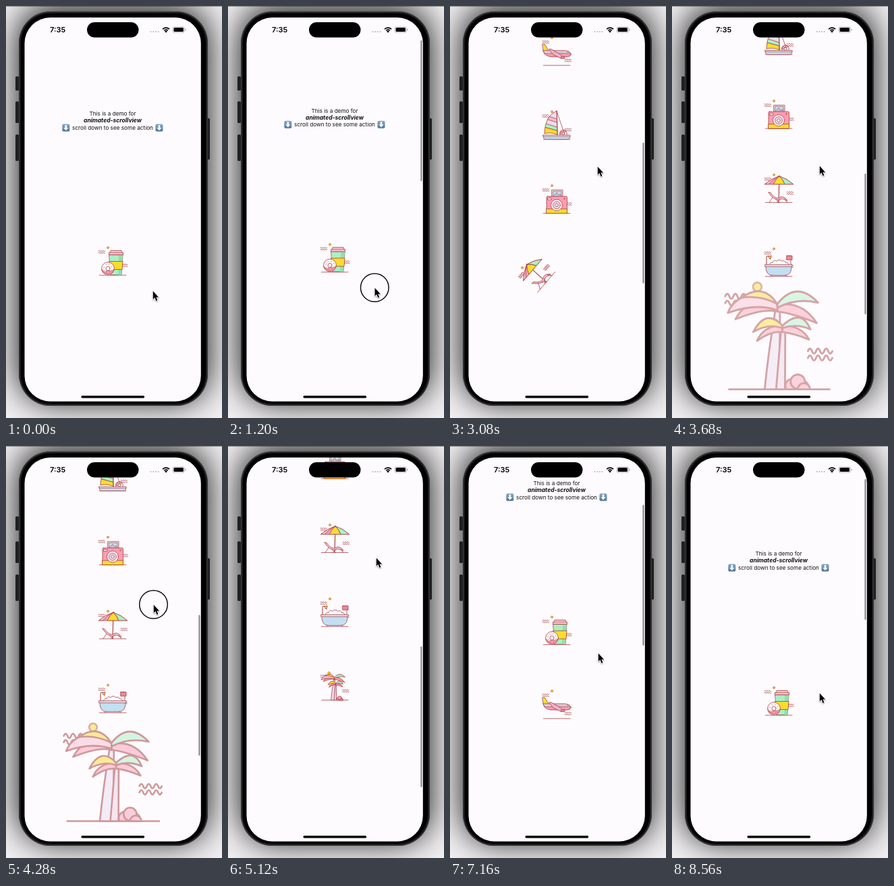
Write an HTML page with a canvas that moves like this. It is 320 px wide and 609 px high and loops after 8.6 s.

```html
<!DOCTYPE html>
<html lang="en">
<head>
<meta charset="utf-8">
<title>Scroll demo</title>
<style>
html, body { margin: 0; width: 100%; height: 100%; overflow: hidden; background: #ccc; }
canvas { display: block; width: 320px; height: 609px; }
</style>
</head>
<body>
<canvas id="stage"></canvas>
<script>
const W = 320, H = 609, LOOP = 8600, LAG = 48;
const INK = '#a3393c', PINK = '#fa9db4', YELLOW = '#fbdc2c', GREEN = '#aaf0c6',
  BLUE = '#c3dff2', LILAC = '#eadcee', WHITE = '#fff', PAPER = '#fdfbfe';
const dpr = window.devicePixelRatio || 1;

function makeLayer(canvas) {
  canvas.width = W * dpr;
  canvas.height = H * dpr;
  const c = canvas.getContext('2d');
  c.scale(dpr, dpr);
  return c;
}
const main = makeLayer(document.getElementById('stage'));
const layer = makeLayer(document.createElement('canvas'));
let g = main;

// ---- drawing helpers
function shape(d, fill, line = INK, width = 0.75) {
  const p = new Path2D(d);
  if (fill) { g.fillStyle = fill; g.fill(p); }
  if (line) { g.strokeStyle = line; g.lineWidth = width; g.stroke(p); }
}
function disc(x, y, r, fill, line = INK, width = 0.75) {
  g.beginPath();
  g.arc(x, y, r, 0, Math.PI * 2);
  if (fill) { g.fillStyle = fill; g.fill(); }
  if (line) { g.strokeStyle = line; g.lineWidth = width; g.stroke(); }
}
function box(x, y, w, h, r, fill) {
  g.beginPath();
  g.roundRect(x, y, w, h, r);
  g.fillStyle = fill;
  g.fill();
}
function waves(x, y, n = 3) {
  for (const dy of [0, 2.7]) {
    let d = `M${x} ${y + dy}`;
    for (let i = 0; i < n; i++) d += 'q.8 -1.9 1.6 0t1.6 0';
    shape(d, null);
  }
}
function scenery(rx, ry, n = 3) {
  disc(-7, -19.3, 1.5, YELLOW, '#b9653a');
  waves(-21, -14.3);
  waves(rx, ry, n);
  shape('M-19.7 21.5H20', null);
}

// ---- icons, centred on the origin
function coffee() {
  scenery(12.5, 5.5);
  shape('M-5 -9H15L13 21H-3Z', GREEN);
  shape('M9 -9H15L13 21H8Z', '#93dfb3', null);
  shape('M-5 1H15L14 13H-4Z', YELLOW);
  shape('M-5.5 -9V-12H-4L-3 -15H13L14 -12H15.5V-9Z', '#fbc3d0');
  shape('M-4 -12H14', null, INK, 0.6);
  disc(-7, 11.6, 9.4, '#fff4f6');
  shape('M-16 13A9.4 9.4 0 0 0 2 13Q-1 16 -4 15T-10 16T-16 13Z', PINK, INK, 0.6);
  disc(-7, 11.6, 3, WHITE);
  for (let i = 0; i < 8; i++) {
    const a = i * 0.785 + 0.3;
    disc(-7 + 6.2 * Math.cos(a), 11.6 + 6.2 * Math.sin(a), 0.5, INK, null);
  }
}
function plane() {
  scenery(12, 12.8);
  shape('M-21 -9.5H-17.5L-12 -0.5 -19 2Z', YELLOW);
  shape('M-20 -0.5H12Q19 0 21.5 5Q20.5 8.5 15 8.5H-9Q-18 7 -20 -0.5Z', '#dccddd');
  shape('M-18.5 4H21Q20 8.5 15 8.5H-9Q-16 7.5 -18.5 4Z', PINK, INK, 0.6);
  shape('M-11 -2.5H-8L5 5 11 11H6L-5 5.5Z', '#f1b3c3');
  shape('M7 8.5H12V11H7Z', PINK);
  shape('M15 1.8H18.5', null);
  for (let x = -2; x < 13; x += 3) disc(x, 2, 0.45, INK, null);
}
function sail() {
  scenery(12, 6);
  const canvas = 'M0 -20.5Q-17 -14 -18.2 13Q-8 10.5 1 14.5Z';
  g.save();
  g.clip(new Path2D(canvas));
  shape('M-20 -22H2V16H-20Z', LILAC, null);
  shape('M-20 -15L2 -8V-3L-20 -10Z', '#f7bccd');
  shape('M-20 -3L2 4V9L-20 3Z', GREEN);
  shape('M-20 3L2 9V16H-20Z', YELLOW);
  g.restore();
  shape(canvas, null);
  shape('M0 -20.5L1 15M0 -20.5L10 9', null);
  disc(10, 13, 5.3, WHITE);
  shape('M4.7 13A5.3 5.3 0 0 1 7 8.6L8.5 11V13ZM10 7.7A5.3 5.3 0 0 1 14 9.5L12 11.5 10 11Z', PINK);
  disc(10, 13, 2, WHITE);
  shape('M-20 15.5H20Q20 21.5 16 21.5H-16Q-20 21.5 -20 15.5Z', BLUE);
  shape('M-20 15.5H20V17.5H-19.5Z', '#e4eaf5', INK, 0.6);
}
function camera() {
  scenery(16, 6.4, 2);
  shape('M-7 -13H9V0H-7Z', '#dfe9f2');
  shape('M-5 -11H7V-4H-5Z', BLUE, INK, 0.6);
  shape('M-5 -4L0 -9 3 -5 5 -7 7 -4', '#c8c3da', INK, 0.6);
  shape('M-13.5 -3.5H14Q15.5 -3.5 15.5 -2V21.5H-15V-2Q-15 -3.5 -13.5 -3.5Z', PINK);
  shape('M-15 15H15.5V21.5H-15Z', YELLOW);
  shape('M-13 -1H-8V1.5H-13Z', WHITE);
  disc(0, 9.5, 8.4, '#fdf3f6');
  disc(0, 9.5, 5.4, LILAC);
  disc(0, 9.5, 2.3, WHITE);
  disc(11.5, 0, 0.8, YELLOW);
}
function beach() {
  scenery(12, 6.3);
  shape('M1 -17L0 21.5', null, INK, 1.1);
  shape('M1 -17.5Q-11 -13.5 -20.5 -5.5H21.5Q13 -13.5 1 -17.5Z', PINK);
  shape('M1 -17.5Q-5 -12 -8 -5.5H9Q7 -12 1 -17.5Z', YELLOW);
  shape('M1 -17.5Q7 -12 9 -5.5H21.5Q13 -13.5 1 -17.5Z', GREEN);
  shape('M1 -17.5Q-11 -13.5 -20.5 -5.5H-15Q-8 -13 1 -17.5Z', '#f9ccd8');
  shape('M-15 6.5L-12 7Q-6 16 0 15Q6 10 13 18L12 19.5Q5 14 1 17.5Q-8 18.5 -15 6.5Z', '#fbc3d0');
  shape('M-9 14L-14 21.5M-4 17L1 21.5M3 16L-3 21.5M9 16L13 21.5', null);
}
function bath() {
  scenery(15, 5, 2);
  shape('M-18 5V-7Q-18 -9 -15 -8.5L-12 -7M-14 -5L-11 -8.5', null, INK, 1);
  shape('M-15 -8L-11 -9 -12 -4Z', YELLOW);
  shape('M18 5V-9H12', null);
  shape('M12 -9H20V-3H12Z', '#ef8795');
  shape('M-14 5Q-13 0 -9 1Q-7 -4 -3 -1Q1 -5 5 -1Q9 -3 10 1Q14 0 15 5Z', WHITE);
  shape('M-19 4.5H19Q20 20 9 20H-9Q-20 20 -19 4.5Z', BLUE);
  shape('M-20 4H20V7H-20Z', '#e0ebf7');
  shape('M-10 20L-12 21.5M10 20L12 21.5', null);
}
function palm() {
  disc(-8.4, -19.2, 1.7, YELLOW, '#b9653a');
  waves(-21, -15.5);
  waves(11.5, 6);
  shape('M-19.5 21H20', null);
  shape('M-1 -12Q-4 6 -5.5 21H0Q.6 2 0.5 -12Z', LILAC);
  shape('M1 -3Q0 10 -1 21H2.5Q2.6 8 2.6 -3Z', '#f0d3e2');
  const fronds = [
    ['M-.5 -12Q-12 -16 -17 -6.5Q-6 -11 -.5 -9.5Z', PINK],
    ['M-.5 -12Q9 -14 15 -5Q5 -9 -.5 -9.5Z', PINK],
    ['M-.5 -12Q-6 -21 -14.5 -15Q-18.5 -13 -20 -9Q-9 -13 -.5 -10Z', '#f7bfce'],
    ['M-.5 -12.5Q-6 -21 -14.5 -15Q-7 -16 -.5 -12.5Z', YELLOW],
    ['M-.5 -12.5Q7 -22 15.5 -13Q7 -15 -.5 -11Z', GREEN],
    ['M1.5 -4Q-6 -4 -8.5 2Q-3 -2 1.5 -1.5Z', PINK],
    ['M1.5 -4Q9 -4 12 1.5Q6 -1 1.5 -1.5Z', PINK],
    ['M1.5 -4Q-5 -11 -10 -1.5Q-4 -5 1.5 -3Z', YELLOW],
    ['M1.5 -4Q9 -11 12.5 -2.5Q7 -5 1.5 -3Z', GREEN]
  ];
  for (const [d, fill] of fronds) shape(d, fill);
  shape('M3 21A2.7 2.7 0 0 1 7 17.5Q12 17 12 21Z', PINK);
  disc(7.5, 18, 2.8, '#f4a3b6');
  shape('M7.5 21A2.4 2.4 0 0 1 12.3 21Z', PINK);
}

// Each item: icon, entrance from p = 0 (hidden) to 1 (settled), entry line
const items = [
  { draw: coffee },
  { draw: plane, enter: p => ({ x: -231 * (1 - p) }) },
  { draw: sail, enter: p => ({ x: 231 * (1 - p) }) },
  { draw: camera, enter: p => ({ alpha: p }) },
  { draw: beach, enter: p => ({ x: -231 * (1 - p), turn: -Math.PI * 2 * (1 - p) }) },
  { draw: bath, enter: p => ({ scale: Math.max(0.015, p) }) },
  { draw: palm, line: 529, enter: p => ({ scale: 6 - 5 * p, alpha: p }) }
];

// ---- scroll and pointer: drags, each followed by a fling that decays
const drags = [
  { t0: 900, t1: 1703, s0: 0, s1: 90, x0: 217, x1: 213, y: 421, pow: 3, end: 321, tau: 155 },
  { t0: 2740, t1: 3075, s0: 321, s1: 415, x0: 213, x1: 218, y: 331, pow: 2.6, end: 549, tau: 175 },
  { t0: 4200, t1: 4900, s0: 549, s1: 641, x0: 218, x1: 219, y: 235.5, pow: 2, end: 690, tau: 160 },
  { t0: 5460, t1: 5899, s0: 690, s1: 590, x0: 219, x1: 219, y: 206, pow: 2.6, end: 103, tau: 215 },
  { t0: 7180, t1: 7500, s0: 103, s1: 44, x0: 219, x1: 218, y: 306, pow: 1.6, bounce: true }
];
const clamp = v => Math.max(0, Math.min(1, v));
const mix = (a, b, k) => a + (b - a) * k;
const lastDrag = t => drags.filter(d => d.t0 <= t).pop();
const dragPart = (d, t) => Math.pow(clamp((t - d.t0) / (d.t1 - d.t0)), d.pow);

function scrollAt(t) {
  const d = lastDrag(t);
  if (!d) return 0;
  if (t < d.t1) return mix(d.s0, d.s1, dragPart(d, t));
  const u = t - d.t1;
  if (d.bounce) return (d.s1 - 0.5 * u) * Math.exp(-u / 90);
  return d.end + (d.s1 - d.end) * Math.exp(-u / d.tau);
}
function pointerAt(t) {
  const d = lastDrag(t);
  if (!d) return { x: drags[0].x0, y: drags[0].y };
  const k = dragPart(d, t), next = drags[drags.indexOf(d) + 1];
  const p = { x: mix(d.x0, d.x1, k), y: d.y - (d.s1 - d.s0) * k, down: t < d.t1 };
  if (next && t > d.t1) {
    const m = clamp((t - d.t1) / (next.t0 - d.t1));
    p.y = mix(p.y, next.y, m * m * (3 - 2 * m));
  }
  return p;
}

// ---- parts of the picture
function phone() {
  g.fillStyle = '#f3f1f3';
  g.fillRect(0, 0, W, H);
  g.save();
  g.shadowColor = 'rgba(0,0,0,.95)';
  g.shadowBlur = 50 * dpr;
  g.shadowOffsetY = -6 * dpr;
  box(19, 8, 280, 583, 47, '#303033');
  g.restore();
  g.fillStyle = 'rgba(0,0,0,.35)';
  g.fillRect(0, 0, W, 1);
  for (const [x, y, h] of [[14, 104, 21], [14, 141, 32], [14, 190, 39], [297, 166, 61]])
    box(x, y, 5, h, 1.5, '#202022');
  box(19, 8, 280, 583, 47, '#363638');
  box(20.5, 9.5, 277, 580, 45, '#171718');
  box(22, 11, 274, 577, 44, '#000');
}
function label(text, y, font) {
  g.font = font + ', sans-serif';
  g.fillStyle = '#111';
  g.textAlign = 'center';
  g.fillText(text, 158, y);
}
function arrowTile(x, y) {
  const fill = g.createLinearGradient(0, y, 0, y + 11);
  fill.addColorStop(0, '#86a8c2');
  fill.addColorStop(1, '#4f7698');
  box(x, y, 11, 11, 1.8, fill);
  g.save();
  g.translate(x + 5.5, y + 5.5);
  shape('M-1.3 -4H1.3V0H3.6L0 4 -3.6 0H-1.3Z', WHITE, null);
  g.restore();
}
function intro(s) {
  g.save();
  g.translate(0, -s);
  label('This is a demo for', 162.3, '8.2px Inter');
  label('animated-scrollview', 172.4, 'italic 700 8.5px Inter');
  label('scroll down to see some action', 183, '8.2px Inter');
  arrowTile(83.3, 174.6);
  arrowTile(221.5, 174.6);
  g.restore();
}
function drawItem(item, i, s, late) {
  const base = 376.5 + 109.3 * i;
  const p = clamp(((item.line || 504) - (base - late)) / 90);
  const { x = 0, turn = 0, scale = 1, alpha = 1 } = item.enter ? item.enter(p) : {};
  if (alpha === 0) return;
  if (alpha < 1) {
    g = layer;
    g.clearRect(0, 0, W, H);
  }
  g.save();
  g.translate(158 + x, base - s);
  g.rotate(turn);
  g.scale(scale, scale);
  g.lineJoin = g.lineCap = 'round';
  item.draw();
  g.restore();
  if (alpha < 1) {
    g = main;
    g.globalAlpha = alpha;
    g.drawImage(layer.canvas, 0, 0, W, H);
    g.globalAlpha = 1;
  }
}
function statusBar() {
  box(120, 24, 76.5, 22.5, 11.3, '#000');
  g.font = '600 11px Inter, sans-serif';
  g.fillStyle = '#000';
  g.textAlign = 'left';
  g.fillText('7:35', 65, 39.2);
  for (let i = 0; i < 4; i++) disc(214.5 + i * 3.7, 38, 1, '#b5b5b8', null);
  g.strokeStyle = '#000';
  g.lineWidth = 1.7;
  for (const r of [3.8, 6.9]) {
    g.beginPath();
    g.arc(237, 39, r, -Math.PI * 0.76, -Math.PI * 0.24);
    g.stroke();
  }
  shape('M237 39.6L235 37.4Q237 35.8 239 37.4Z', '#000', null);
  box(247, 30.5, 17.5, 9, 2.8, '#a5a5a8');
  box(247.8, 31.3, 15.9, 7.4, 2.2, PAPER);
  box(248.6, 32, 14.3, 6, 1.6, '#000');
  box(265.2, 33.4, 1.2, 3.2, 0.6, '#a5a5a8');
  box(111.4, 576, 93.8, 3.4, 1.7, '#000');
}
function pointer(p) {
  if (p.down) disc(p.x + 0.5, p.y, 20.8, null, '#111', 1.5);
  g.save();
  g.translate(p.x + 1.2, p.y + 1.3);
  g.scale(0.86, 0.86);
  g.lineJoin = 'round';
  g.shadowColor = 'rgba(0,0,0,.3)';
  g.shadowBlur = 2 * dpr;
  g.shadowOffsetY = dpr;
  const d = 'M-.5 -1V13L2.6 10.2 5 15.8 7.2 14.8 4.9 9.5H9.2Z';
  shape(d, WHITE, WHITE, 1.8);
  g.shadowColor = 'transparent';
  shape(d, '#000', null);
  g.restore();
}

function draw(t) {
  const s = scrollAt(t), late = scrollAt(t - LAG);
  phone();
  g.save();
  g.beginPath();
  g.roundRect(27.5, 17, 261.3, 567.5, 38);
  g.fillStyle = PAPER;
  g.fill();
  g.clip();
  intro(s);
  items.forEach((item, i) => drawItem(item, i, s, late));
  g.globalAlpha = clamp((t - 900) / 80);
  box(285.4, 49 + s * 0.365, 2, 208, 1, '#858387');
  g.globalAlpha = 1;
  statusBar();
  g.restore();
  pointer(pointerAt(t));
}

const start = performance.now();
function tick() {
  draw((performance.now() - start) % LOOP);
  requestAnimationFrame(tick);
}
tick();
</script>
</body>
</html>
```
